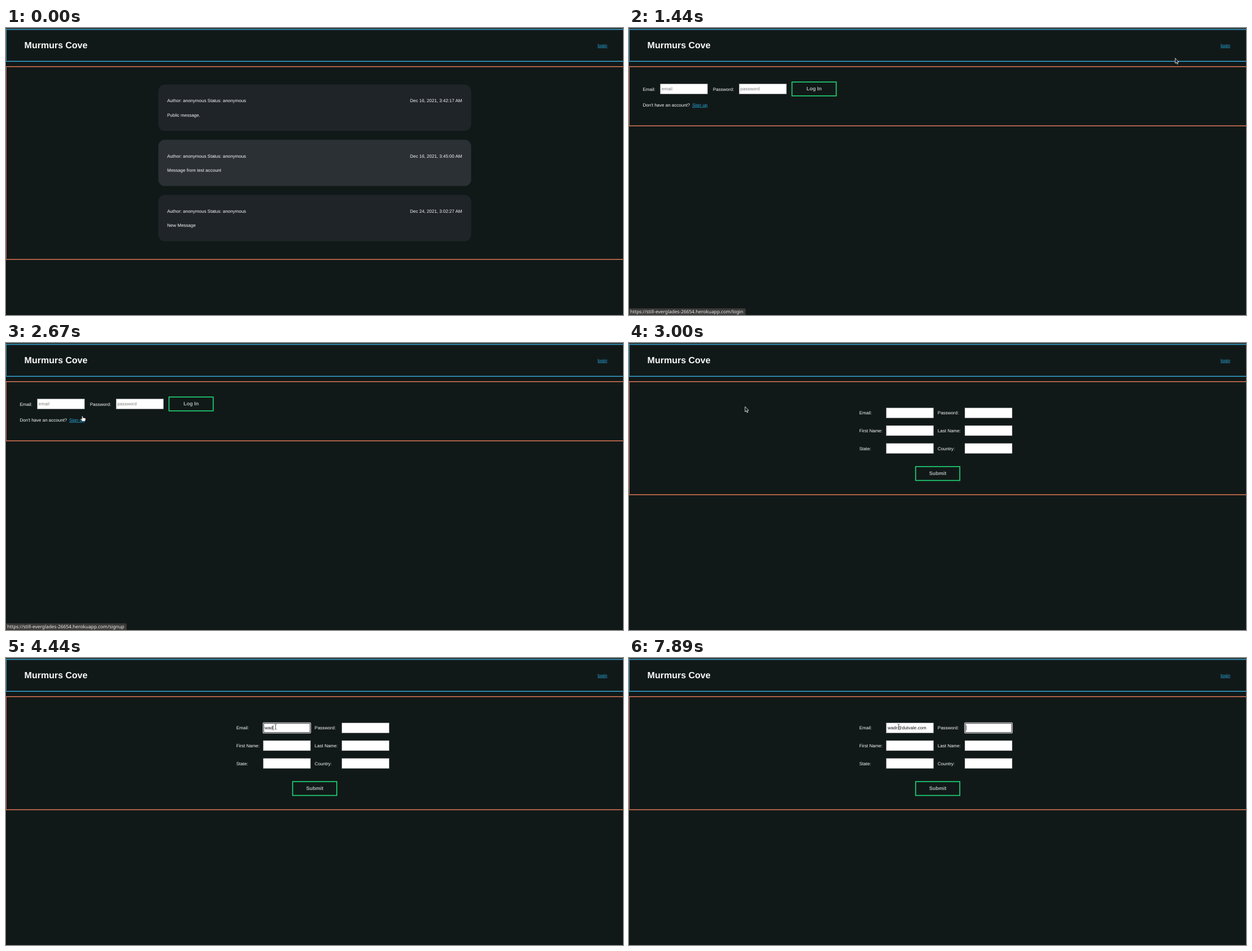
Write an HTML page that moves like this. It is 1095 px wide and 511 px high and loops after 8 s.

```html
<!DOCTYPE html>
<html lang="en">
<head>
<meta charset="utf-8">
<title>Message board sign-up</title>
<style>
html, body { margin: 0; width: 100%; height: 100%; overflow: hidden; background: #111918; }
svg { display: block; width: 100%; height: 100%; }
text { font: 8px "Liberation Sans", Arial, sans-serif; fill: #fafafa; text-rendering: geometricPrecision; white-space: pre; }
.title { font-size: 16px; font-weight: bold; }
.link { fill: #25a9df; text-decoration: underline; text-decoration-thickness: .6px; }
.btn { font-size: 9px; font-weight: bold; fill: #b4b7b7; text-anchor: middle; }
.end { text-anchor: end; }
.hint { fill: #7c7c7c; }
.typed { fill: #111; }
.ui { font: 8.35px "Noto Sans", "Open Sans", sans-serif; fill: #f0f0f0; }
.item { font-size: 8.7px; }
.strong { font-weight: 600; }
</style>
</head>
<body>
<svg id="stage" viewBox="0 0 1095 511" xmlns="http://www.w3.org/2000/svg"></svg>
<script>
const LOOP = 8000, TICK = 1000 / 9;
const BLUE = '#38a9d8', CORAL = '#de7757', GREEN = '#1fd074';
const stage = document.getElementById('stage');

const rect = (x, y, w, h, attrs) => `<rect x="${x}" y="${y}" width="${w}" height="${h}" ${attrs}/>`;
const text = (x, y, str, cls = '') => `<text x="${x}" y="${y}" class="${cls}">${str}</text>`;
const group = (id, body) => `<g id="${id}">${body}</g>`;

// Bordered section whose right edge lies outside the stage
const frame = (top, bottom, color) =>
  rect(0, top, 1095, 1.5, `fill="${color}"`) +
  rect(0, bottom, 1095, 1.5, `fill="${color}"`) +
  rect(0, top, 0.9, bottom - top, `fill="${color}"`);

const field = (x, y) => rect(x, y, 84, 18, 'fill="#fff" stroke="#767676" stroke-width=".5"');

const button = (x, y, label) =>
  rect(x, y, 78.4, 24.6, `fill="none" stroke="${GREEN}" stroke-width="1.7"`) +
  text(x + 39.2, y + 15.1, label, 'btn');

const card = (y, color, date, message) =>
  rect(270.3, y, 555.2, 82.2, `rx="11.5" fill="${color}"`) +
  text(286, y + 31.5, 'Author: anonymous Status: anonymous') +
  text(809.5, y + 31.5, date, 'end') +
  text(286, y + 56.7, message);

const formRow = (y, left, right) =>
  text(408.7, y + 11.8, left) + field(456.5, y) +
  text(547.8, y + 11.8, right) + field(596, y);

const header =
  rect(0, 0, 1095, 1, 'fill="#3a3c3b"') +
  frame(1.8, 58.6, BLUE) +
  text(32.6, 36.2, 'Murmurs Cove', 'title') +
  text(1050, 33.7, 'login', 'link');

const board =
  frame(68, 411.3, CORAL) +
  card(100.8, '#1f2428', 'Dec 16, 2021, 3:42:17 AM', 'Public message.') +
  card(199.1, '#2b3035', 'Dec 16, 2021, 3:45:00 AM', 'Message from test account') +
  card(297.3, '#1f2428', 'Dec 24, 2021, 3:02:27 AM', 'New Message');

const login =
  frame(68, 173.5, CORAL) +
  text(24.5, 111.7, 'Email:') + field(55.5, 99.5) + text(57.8, 111.2, 'email', 'hint') +
  text(149, 111.7, 'Password:') + field(195.5, 99.5) + text(197.6, 111.2, 'password', 'hint') +
  button(289.3, 96.2, 'Log In') +
  text(24.5, 139.8, "Don't have an account?") + text(112.2, 139.8, 'Sign up', 'link');

const signup =
  frame(68, 269.4, CORAL) +
  formRow(115.5, 'Email:', 'Password:') +
  formRow(147, 'First Name:', 'Last Name:') +
  formRow(178.8, 'State:', 'Country:') +
  button(508.7, 220.1, 'Submit') +
  group('focus',
    rect(-0.2, -0.2, 84.4, 18.4, 'rx="1.2" fill="none" stroke="#fff" stroke-width="1.1"') +
    rect(0.8, 0.8, 82.4, 16.4, 'fill="#fff" stroke="#111" stroke-width=".9"')) +
  `<text id="typed" class="typed" x="459" y="127.3"></text>` +
  rect(0, 120, 0.7, 9, 'id="caret" fill="#111"');

const popup =
  rect(456.5, 134.8, 130.2, 65.6, 'rx="1" fill="#3d3c3b"') +
  rect(456.5, 177, 130.2, 0.6, 'fill="#474645"') +
  text(463, 152.2, 'roddaskwell@dutva.com', 'ui item strong') +
  text(463, 165.4, 'Rodrin Daskwell', 'ui') +
  text(463, 192.1, 'Manage addresses…', 'ui item');

const status =
  '<path id="bar" fill="#3c3b3a"/>' +
  '<text id="address" class="ui" x="2" y="508.2"></text>';

// Pointers, with the hotspot at 0,0
const arrow = '<path d="M0 0V9.2L2.1 7.3L3.5 10.6L5 9.9L3.6 6.8H6.3Z" fill="#111" stroke="#fff" stroke-width=".8" stroke-linejoin="round"/>';
const hand = '<path d="M-1.2 .4Q-.4-.6.3.4V3L4.6 3.9Q5.5 4.2 5.3 5.6L4.4 9.2H-.6L-3.6 5.8Q-3.9 4.8-2.8 4.8L-1.2 6Z" fill="#fff" stroke="#222" stroke-width=".4"/>';
const beam = '<path d="M-1.9-4.5H-.6L0-4L.6-4.5H1.9M0-4V4M-1.9 4.5H-.6L0 4L.6 4.5H1.9" fill="none" stroke="#fff" stroke-width="1.5"/>' +
  '<path d="M-1.9-4.5H-.6L0-4L.6-4.5H1.9M0-4V4M-1.9 4.5H-.6L0 4L.6 4.5H1.9" fill="none" stroke="#333" stroke-width=".8"/>';

stage.innerHTML =
  rect(0, 0, 1095, 511, 'fill="#111918"') + header +
  group('board', board) + group('login', login) + group('signup', signup) +
  group('popup', popup) + group('status', status) +
  group('pointer', group('arrow', arrow) + group('hand', hand) + group('beam', beam));

const el = {};
stage.querySelectorAll('[id]').forEach(node => { el[node.id] = node; });

// Each list holds [start time, value]
const pages = [[0, 'board'], [1330, 'login'], [2890, 'signup']];
const pointers = [[0, ''], [330, 'arrow'], [1000, 'hand'], [1330, 'arrow'], [2440, 'hand'], [3000, 'arrow'], [3440, 'beam']];
const statuses = [[0, ''], [1220, 'login'], [1560, ''], [2560, 'signup'], [3000, '']];
const keys = [
  [0, ''], [4220, 'w'], [4330, 'wa'], [4440, 'wad'], [4670, 'wadr'], [4780, 'wadr@'],
  [5110, 'wadr@d'], [5220, 'wadr@dut'], [5670, 'wadr@du'], [5780, 'wadr@d'],
  [6220, 'wadr@'], [6440, 'wadr@d'], [6670, 'wadr@dut'], [6780, 'wadr@dutva'],
  [6890, 'wadr@dutvale'], [7110, 'wadr@dutvale.'], [7330, 'wadr@dutvale.co'], [7440, 'wadr@dutvale.com']
];
const path = [
  [330, 672, 48], [560, 830, 46], [780, 985, 39], [1000, 1057, 31], [1220, 1057, 31],
  [1440, 981.3, 52.5], [1670, 690, 82], [2000, 310, 116], [2330, 160, 129],
  [2670, 136, 130], [2890, 136, 130], [3110, 270, 98], [3330, 445, 110],
  [3440, 475.5, 119], [3770, 475.5, 119], [3780, 478.5, 122.5]
];

const at = (list, t) => list.reduce((value, [start, next]) => t >= start ? next : value, '');
const show = (node, on) => node.setAttribute('display', on ? 'inline' : 'none');

function position(t) {
  const i = path.findIndex(point => point[0] > t);
  if (i === 0) return path[0].slice(1);
  if (i < 0) return path[path.length - 1].slice(1);
  const [t0, x0, y0] = path[i - 1], [t1, x1, y1] = path[i];
  const k = (t - t0) / (t1 - t0);
  return [x0 + (x1 - x0) * k, y0 + (y1 - y0) * k];
}

function render(time) {
  // The screen refreshes nine times a second
  const t = Math.floor((time + 5) / TICK) * TICK + 5;

  const page = at(pages, t);
  for (const id of ['board', 'login', 'signup']) show(el[id], id === page);

  const route = at(statuses, t);
  show(el.status, route);
  if (route) {
    el.address.textContent = 'https://still-everglades-26654.herokuapp.com/' + route;
    const w = route === 'login' ? 207 : 214;
    el.bar.setAttribute('d', `M0 499.3H${w - 2}Q${w} 499.3 ${w} 501.3V511H0Z`);
  }

  const inPassword = t >= 7890;
  el.typed.textContent = at(keys, t);
  show(el.focus, t >= 3330);
  el.focus.setAttribute('transform', `translate(${inPassword ? 596 : 456.5} 115.5)`);
  show(el.popup, t >= 3440 && t < 4220);
  show(el.caret, t >= 3330 && !(t >= 6000 && t < 6220));
  if (page === 'signup') {
    const x = inPassword ? 598.3 : 459 + el.typed.getComputedTextLength();
    el.caret.setAttribute('x', x);
  }

  const kind = at(pointers, t);
  for (const id of ['arrow', 'hand', 'beam']) show(el[id], id === kind);
  el.pointer.setAttribute('transform', `translate(${position(t).join(' ')})`);
}

const start = performance.now();
function loop() {
  render((performance.now() - start) % LOOP);
  requestAnimationFrame(loop);
}
loop();
</script>
</body>
</html>
```
